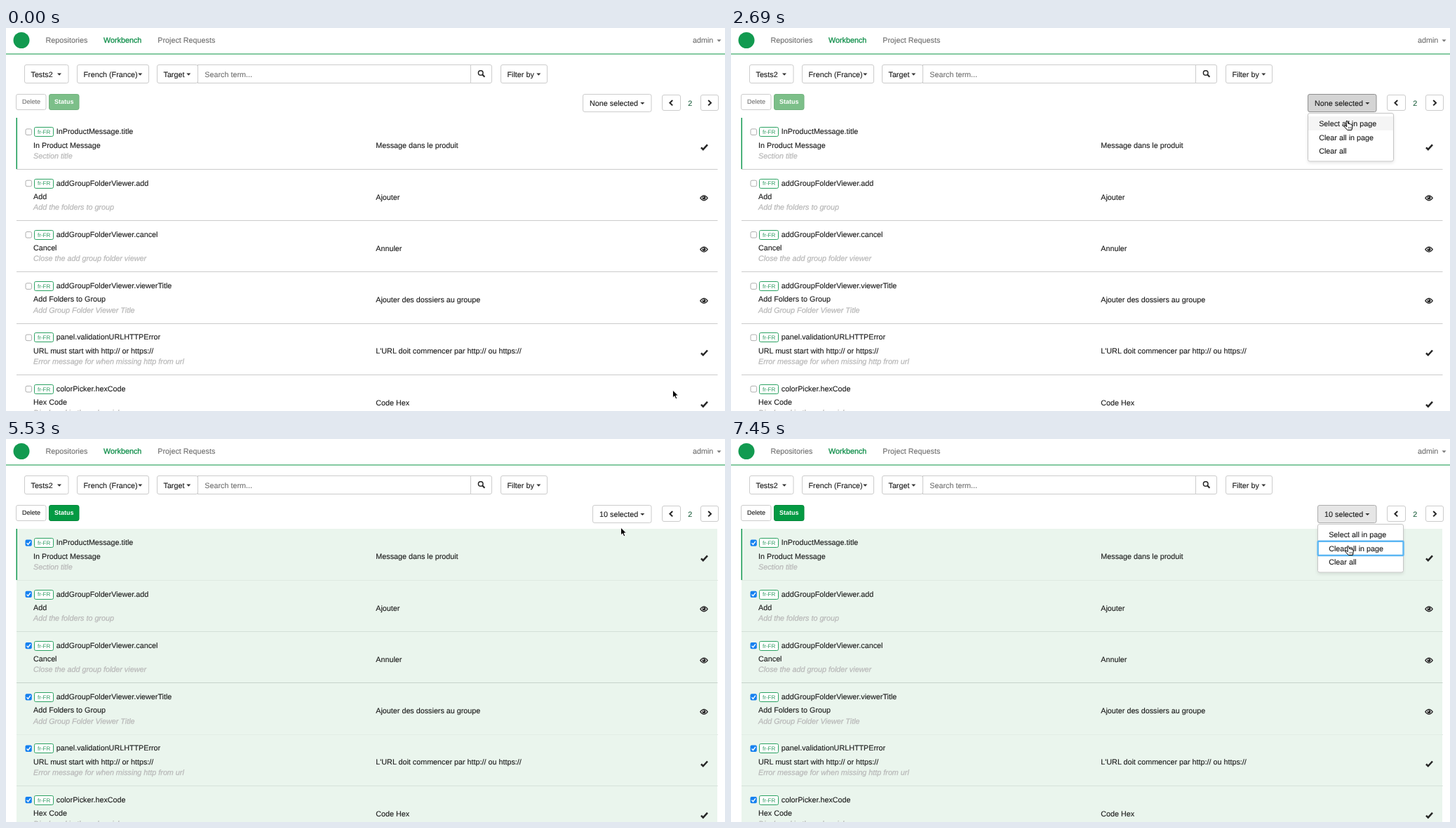
Animation, 1025 px wide and 546 px high, one loop 8 s. Source, as an HTML page:

```html
<!DOCTYPE html>
<html lang="en">
<head>
<meta charset="utf-8">
<title>Workbench</title>
<style>
html, body { margin: 0; width: 100%; height: 100%; overflow: hidden; background: #fff; }
svg { display: block; width: 1025px; height: 546px; }
text {
  font-family: "Liberation Sans", Arial, sans-serif;
  font-size: 10.77px; fill: #1c1c1c; stroke: #1c1c1c; stroke-width: .12px;
  text-rendering: geometricPrecision; white-space: pre;
}
.nav { fill: #707070; stroke: #707070; }
.green { fill: #088a44; stroke: #088a44; stroke-width: .25px; }
.count { fill: #1b5e3c; stroke: #1b5e3c; }
.hint { fill: #b8b8b8; stroke: #b8b8b8; stroke-width: .25px; font-style: italic; }
.tag { font-size: 8px; fill: #2c9a60; stroke: none; }
.small { font-size: 9px; }
.bold { font-weight: bold; fill: #fff; stroke: none; }
.btn { fill: #fff; stroke: #ccc; }
</style>
</head>
<body>
<svg id="stage" viewBox="0 0 1025 546">
  <defs>
    <filter id="shade" x="-20%" y="-20%" width="140%" height="150%">
      <feDropShadow dx="0" dy="2" stdDeviation="2" flood-color="#000" flood-opacity=".1"/>
    </filter>
    <filter id="glow" x="-20%" y="-40%" width="140%" height="180%">
      <feDropShadow dx="0" dy="0" stdDeviation="1.6" flood-color="#08964a" flood-opacity=".6"/>
    </filter>
  </defs>
  <g id="page"></g>
  <g id="picker"></g>
  <g id="menu"></g>
  <g id="arrow">
    <path d="M-.6 0V11.2L2 8.8L3.8 13L5.8 12.1L4 8.1H7.5Z" fill="#000" stroke="#fff" stroke-width="1" stroke-linejoin="round"/>
  </g>
  <g id="hand">
    <path d="M-1 1Q0-.5 1 1L2 4.6Q3.2 3.6 4 5Q5.3 4.2 5.9 5.6Q7.3 5.2 7.5 6.8L7.8 9.5L6.8 13.5H.8L-3.6 8.8Q-4.2 7-2.4 7.3L-.2 8.6Z"
      fill="#fff" stroke="#000" stroke-width="1" stroke-linejoin="round"/>
    <path d="M2.4 9V11.5M4.2 9V11.5M6 9V11.5" stroke="#000" stroke-width=".6"/>
  </g>
</svg>
<script>
const LOOP = 8000;
const $ = id => document.getElementById(id);
const rect = (x, y, w, h, attrs = "") => `<rect x="${x}" y="${y}" width="${w}" height="${h}" ${attrs}/>`;
const text = (x, y, s, cls = "") => `<text x="${x}" y="${y}" class="${cls}">${s}</text>`;
const path = (d, attrs = "") => `<path d="${d}" ${attrs}/>`;
const caret = (x, y, fill = "#333") => path(`M${x} ${y}h6l-3 3.2z`, `fill="${fill}"`);
const button = (x, y, w, h) => rect(x, y, w, h, 'rx="2.5" class="btn"');
const dropdown = (x, w, label, caretX) =>
  button(x, 52.5, w, 26) + text(x + 9, 69.5, label) + caret(caretX, 64.6);

const PITCH = 73.3;
const rows = [
  ["InProductMessage.title", "In Product Message", "Section title", "Message dans le produit", 1],
  ["addGroupFolderViewer.add", "Add", "Add the folders to group", "Ajouter", 0],
  ["addGroupFolderViewer.cancel", "Cancel", "Close the add group folder viewer", "Annuler", 0],
  ["addGroupFolderViewer.viewerTitle", "Add Folders to Group", "Add Group Folder Viewer Title", "Ajouter des dossiers au groupe", 0],
  ["panel.validationURLHTTPError", "URL must start with http:// or https://", "Error message for when missing http from url", "L'URL doit commencer par http:// ou https://", 1],
  ["colorPicker.hexCode", "Hex Code", "Displayed in the color picker", "Code Hex", 1]
];

const tick = y => path(`M991 ${y + 1}L993.8 ${y + 3.8}L1000 ${y - 3}`, 'fill="none" stroke="#262626" stroke-width="2.5"');
const eye = y =>
  path(`M989.8 ${y}Q995 ${y - 7} 1000.2 ${y}Q995 ${y + 7} 989.8 ${y}Z`, 'fill="#fff" stroke="#262626" stroke-width="1.3"') +
  `<circle cx="995" cy="${y - .2}" r="2.5" fill="#262626"/><circle cx="994.2" cy="${y - 1}" r=".8" fill="#fff"/>`;

function checkbox(y, on) {
  if (!on) return rect(28, y, 8.6, 8.6, 'rx="2" fill="#fff" stroke="#a5a5a5" stroke-width=".9"');
  return rect(27.5, y - .5, 9.3, 9.3, 'rx="2" fill="#1681f0"') +
    path(`M29.6 ${y + 4.4}l1.9 2.1l3.4-4.6`, 'fill="none" stroke="#fff" stroke-width="1.4"');
}

function row([key, phrase, hint, translation, done], i, on) {
  const y = 128 + i * PITCH, line = Math.floor(y + PITCH) + .5;
  return (on ? rect(15, y, 999, PITCH, 'fill="#eaf5ed"') : "") +
    path(`M15 ${line}H1014.5`, `stroke="${on ? "#c3cfc7" : "#cbcbcb"}"`) +
    checkbox(y + 15.9, on) +
    rect(40.5, Math.round(y + 13.25) + .5, 27, 13, 'rx="2" fill="#fff" stroke="#2ba262"') +
    text(45, y + 23, "fr-FR", "tag") +
    text(71.8, y + 23.2, key) + text(39, y + 42.5, phrase) +
    text(39, y + 57.6, hint, "hint") + text(527.3, y + 43.2, translation) +
    (done ? tick(y + 41.3) : eye(y + 41));
}

function drawPage(on) {
  return '<circle cx="22" cy="17.5" r="11.5" fill="#129a50"/>' +
    text(56.5, 21.3, "Repositories", "nav") + text(139, 21.3, "Workbench", "green") +
    text(216.3, 21.3, "Project Requests", "nav") + text(979, 21.3, "admin", "nav") + caret(1013.5, 16.6, "#777") +
    rect(0, 36.4, 1025, 1.3, 'fill="#43ae70"') +
    dropdown(26.5, 62.5, "Tests2", 73) + dropdown(101.5, 102, "French (France)", 188.3) +
    dropdown(215.5, 58, "Target", 257.3) + dropdown(705.5, 66, "Filter by", 756.3) +
    rect(273.5, 52.5, 389, 26, 'class="btn"') + text(283.3, 69.5, "Search term...", "nav") +
    path("M662.5 52.5H690a2.5 2.5 0 0 1 2.5 2.5V76a2.5 2.5 0 0 1-2.5 2.5H662.5Z", 'class="btn"') +
    '<circle cx="676.7" cy="64" r="3.3" fill="none" stroke="#262626" stroke-width="1.5"/>' +
    path("M679.2 66.5L682.4 69.8", 'stroke="#262626" stroke-width="2"') +
    button(14.5, 94.5, 42.5, 22) +
    `<g opacity="${on ? 1 : .62}">${text(23, 108.4, "Delete", "small")}</g>` +
    rect(61.5, 94.5, 42.5, 22, `rx="2.5" fill="${on ? "#049a43" : "#7cbf89"}" stroke="${on ? "#04883b" : "#70b27d"}"`) +
    text(69, 108.4, "Status", "small bold") +
    button(935.5, 95.5, 26, 22) + button(990.5, 95.5, 25, 22) + text(972.3, 110.6, "2", "count") +
    path("M950.2 103l-3.8 3.7l3.8 3.7M1001.2 103l3.8 3.7l-3.8 3.7", 'fill="none" stroke="#262626" stroke-width="2"') +
    rows.map((r, i) => row(r, i, on)).join("") +
    rect(14.5, 128, 1.5, 73, 'fill="#159a52"');
}

const looks = {
  plain: ["#fff", "#ccc"],
  hover: ["#e6e6e6", "#adadad"],
  down: ["#d4d4d4", "#8f8f8f"],
  glow: ["#d4d4d4", "#7f9686"]
};

function drawPicker(on, look) {
  const x = on ? 836.5 : 822.5, [fill, edge] = looks[look];
  return rect(x, 94.5, 920 - x, 25, `rx="2.5" fill="${fill}" stroke="${edge}" ${look == "glow" ? 'filter="url(#glow)"' : ""}`) +
    text(x + 9.6, 110.7, on ? "10 selected" : "None selected") + caret(904.3, 105.9);
}

function drawMenu(on, hover, focus) {
  const x = on ? 836.5 : 822.5;
  const items = ["Select all in page", "Clear all in page", "Clear all"];
  return rect(x, 121.5, 122, 68.5, 'rx="2.5" fill="#fff" stroke="#c6c6c6" filter="url(#shade)"') +
    items.map((label, i) => {
      const y = 126 + i * 19.9;
      return (hover == i ? rect(x + .5, y, 121, 20, 'fill="#f5f5f5"') : "") +
        (focus == i ? rect(x + .2, y - .2, 121.8, 20.3, 'rx="1" fill="#fff" stroke="#5bb6f3" stroke-width="2.4"') : "") +
        text(x + 15.7, y + 13.6, label);
    }).join("");
}

// time, x, y, pointer
const moves = [
  [0, 951, 516, 0], [150, 947, 491, 0], [300, 929, 400, 0], [450, 900, 255, 0],
  [600, 884, 150, 0], [750, 881, 121, 0], [890, 885, 111, 0], [1040, 887, 108, 0],
  [2090, 885, 109, 1], [2540, 881, 122, 1], [2690, 878, 132, 1], [3590, 877, 131, 0],
  [5530, 877, 126, 0], [5680, 876, 112, 1], [5830, 876, 105, 1],
  [6580, 876, 109, 1], [6730, 877, 121, 1], [6870, 878, 136, 1],
  [7000, 879, 147, 1], [7150, 879.5, 151, 1], [7300, 879.5, 152, 1]
];
// time, selected, button look, menu open, hovered item, focused item
const states = [
  [0, 0, "plain", 0, -1, -1], [2090, 0, "down", 0, -1, -1], [2240, 0, "down", 1, -1, -1],
  [2690, 0, "down", 1, 0, -1], [3440, 0, "hover", 1, 0, 0], [3740, 1, "plain", 0, -1, -1],
  [5680, 1, "hover", 0, -1, -1], [6280, 1, "glow", 0, -1, -1], [6430, 1, "glow", 1, -1, -1],
  [6870, 1, "glow", 1, 0, -1], [7000, 1, "glow", 1, 1, -1], [7450, 1, "hover", 1, 1, 1]
];
const at = (list, t) => list.findLast(e => e[0] <= t);
let shownState, shownRows;

function render(t) {
  const state = at(states, t);
  if (state !== shownState) {
    const [, on, look, open, hover, focus] = shownState = state;
    if (on !== shownRows) $("page").innerHTML = drawPage(shownRows = on);
    $("picker").innerHTML = drawPicker(on, look);
    $("menu").innerHTML = open ? drawMenu(on, hover, focus) : "";
  }
  const [, x, y, hand] = at(moves, t);
  ["arrow", "hand"].forEach((id, i) => {
    $(id).setAttribute("transform", `translate(${x} ${y})`);
    $(id).setAttribute("visibility", i == hand ? "visible" : "hidden");
  });
}

const start = performance.now();
function frame() {
  render((performance.now() - start) % LOOP);
  requestAnimationFrame(frame);
}
frame();
</script>
</body>
</html>
```
